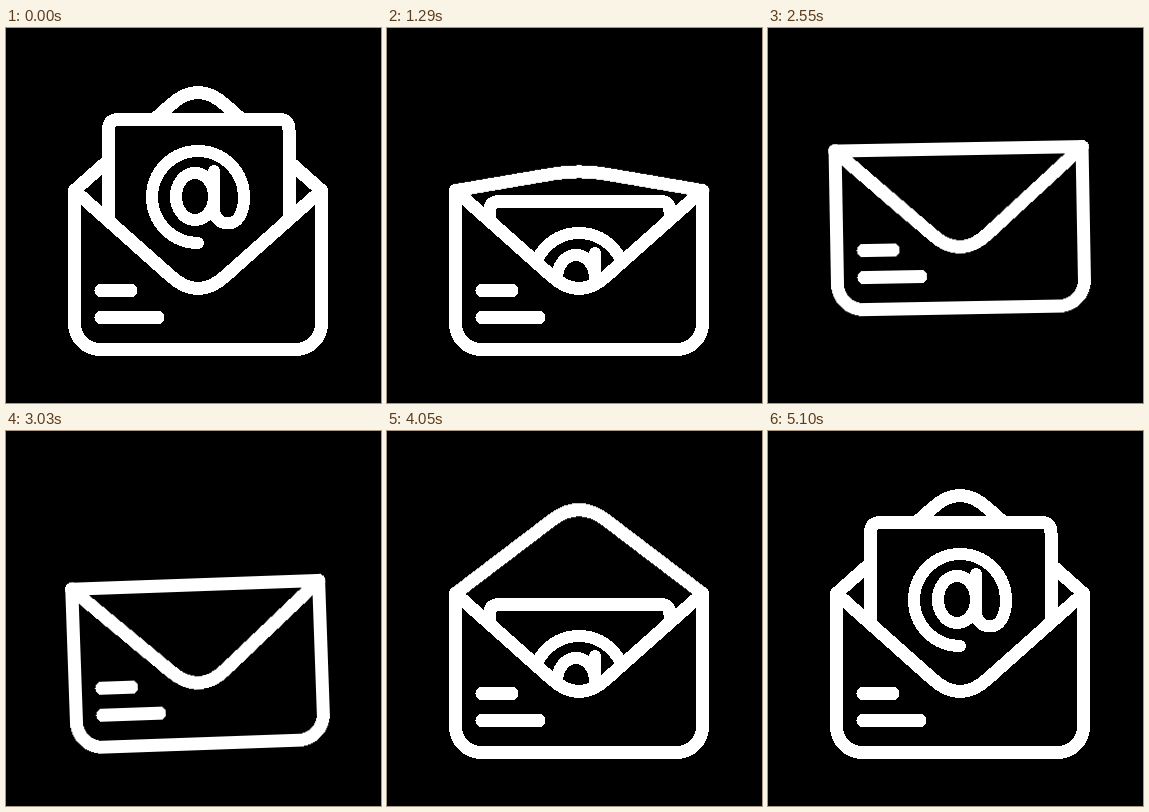
Write an HTML page that moves like this. It is 375 px wide and 375 px high and loops after 5430 ms.

```html
<!DOCTYPE html>
<html lang="en">
<head>
<meta charset="utf-8">
<title>Mail</title>
<style>
  html, body { margin: 0; width: 100%; height: 100%; overflow: hidden; background: #000; }
  svg { display: block; width: 100%; height: 100%; }
  path, ellipse {
    fill: none; stroke: #fff; stroke-width: 13;
    stroke-linecap: round; stroke-linejoin: round;
    shape-rendering: crispEdges;
  }
  .solid { fill: #000; }
  .at { stroke-width: 12; }

  .lift, .tilt, .paper, .flap {
    animation: 5430ms cubic-bezier(.37, 0, .63, 1) infinite;
  }
  .lift { animation-name: lift; }
  .tilt { animation-name: tilt; transform-origin: 192px 242px; }
  .paper { animation-name: slide; }
  .flap { animation-name: flip; transform-origin: 192px 162.5px; }
  .flap path { vector-effect: non-scaling-stroke; }
  .front { animation: show 5430ms step-end infinite; }

  @keyframes slide {
    0%, 93.92%, 100% { transform: translateY(0); }
    16.21%, 77.62% { transform: translateY(82px); }
  }
  @keyframes flip {
    0%, 16.21% { transform: scaleY(1); }
    33.43%, 60.41% { transform: scaleY(-1); }
    77.62%, 100% { transform: scaleY(1); }
  }
  /* The flap passes in front of the paper once it is past the fold. */
  @keyframes show {
    0% { visibility: hidden; }
    24.82% { visibility: visible; }
    69.02%, 100% { visibility: hidden; }
  }
  @keyframes lift {
    0%, 32.78% { transform: translateY(0); }
    44.94% { transform: translateY(-43.5px); }
    60.41%, 100% { transform: translateY(0); }
  }
  @keyframes tilt {
    0%, 32.5% { transform: rotate(0deg); }
    39.6% { transform: rotate(7.5deg); }
    44.94% { transform: rotate(-6deg); }
    48.99% { transform: rotate(3.8deg); }
    55.25% { transform: rotate(-2.1deg); }
    60.41%, 100% { transform: rotate(0deg); }
  }
</style>
</head>
<body>
<svg viewBox="0 0 375 375">
  <g class="lift"><g class="tilt">
    <g class="flap">
      <path d="M68.5 162.5 L165 76.6 Q192 52.4 219 76.6 L315.5 162.5"/>
    </g>
    <g class="paper">
      <path class="solid" d="M102.5 225 V101.5 Q102.5 91.5 112.5 91.5 H273 Q283 91.5 283 101.5 V225"/>
      <ellipse class="at" cx="189" cy="168.5" rx="19" ry="23.5"/>
      <path class="at" d="M192 215 A46 46 0 1 1 238 169 C238 185 232 195.5 222 195.5 C213 195.5 208 189 208 180 V143"/>
    </g>
    <path class="solid" d="M68.5 162.5 L165 248.4 Q192 272.6 219 248.4 L315.5 162.5 V295.5 A26 26 0 0 1 289.5 321.5 H94.5 A26 26 0 0 1 68.5 295.5 Z"/>
    <path d="M95 262.5 H125 M95 289.5 H152"/>
    <g class="front"><g class="flap">
      <path class="solid" d="M68.5 162.5 L165 76.6 Q192 52.4 219 76.6 L315.5 162.5 Z"/>
    </g></g>
  </g></g>
</svg>
</body>
</html>
```
